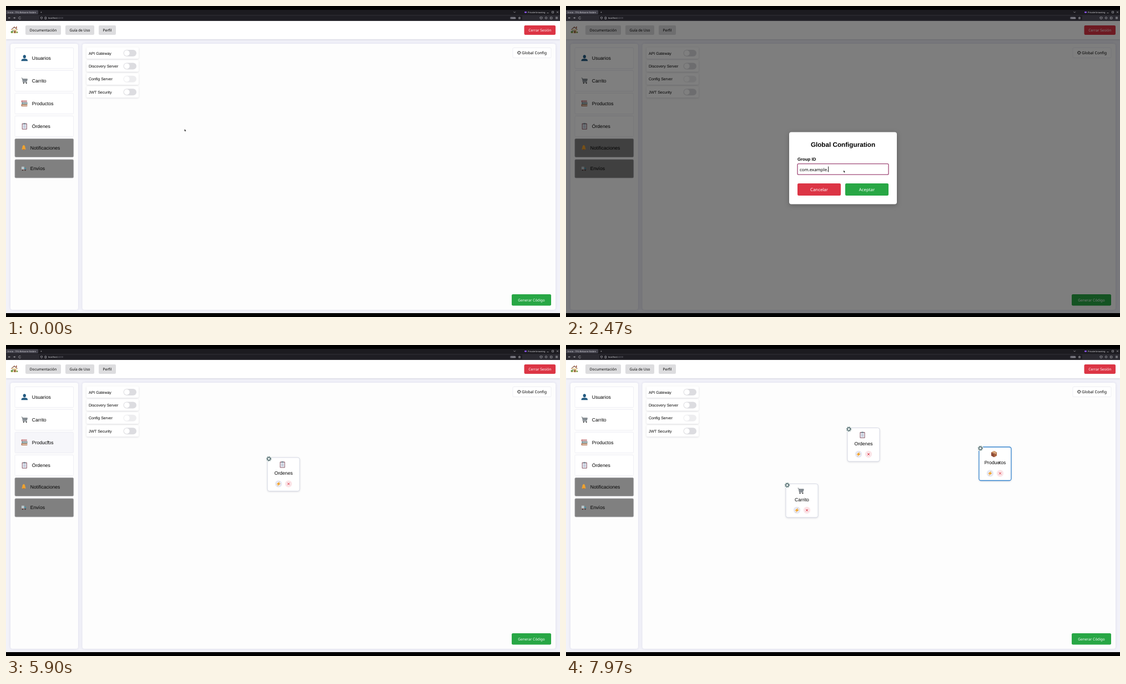
These frames come from a looping animation (998x561 px, 8 s). An HTML page:

```html
<!DOCTYPE html>
<html lang="es">
<head>
<meta charset="utf-8">
<title>Inicio</title>
<style>
html, body { margin: 0; width: 100%; height: 100%; overflow: hidden; background: #000; }
svg { display: block; width: 100vw; height: 100vh; }
text { text-rendering: geometricPrecision; font-family: "Liberation Sans", Arial, sans-serif; fill: #000; }
.noto { font-family: "Noto Sans", "Open Sans", sans-serif; }
.mid { text-anchor: middle; }
.item { font-size: 8.6px; }
.light { fill: #fff; }
.chrome text { font: 4px "Noto Sans", sans-serif; fill: #d8d8dc; }
.chrome .dim { fill: #77767f; }
.line { fill: none; stroke: #cfcfd4; stroke-width: .6; }
.soft { filter: drop-shadow(0 1px 1.5px rgba(0, 0, 30, .13)); }
.panel { fill: #fdfdfd; filter: drop-shadow(0 0 2px rgba(60, 60, 120, .13)); }
.dialog { fill: #fff; filter: drop-shadow(0 2px 4px rgba(0, 0, 0, .25)); }
</style>
</head>
<body>
<svg id="stage" viewBox="0 0 998 561" preserveAspectRatio="none">
  <defs>
    <g id="house">
      <rect x="-4.5" y="-1" width="9" height="7" fill="#efd9a4"/>
      <path d="M-6-.5 0-6 6-.5 5-.2 0-4-5-.2z" fill="#8a5a44"/>
      <path d="M3-6h1.6v3H3z" fill="#a35a48"/>
      <path d="M-.3 1.5h2.6V6H-.3z" fill="#8b5637"/>
      <path d="M-3.4 1h2v2h-2z" fill="#6fa8c8"/>
      <circle cx="-4.5" cy="4" r="2" fill="#6f9b45"/><circle cx="5" cy="4.6" r="1.4" fill="#6f9b45"/>
    </g>
    <g id="person" fill="#235a80">
      <ellipse cy="-2.4" rx="2.6" ry="3.1"/><path d="M-5.8 5.6C-5.8 1.8-3 1.6 0 1.6s5.8.2 5.8 4z"/>
    </g>
    <g id="cart">
      <path d="M-3.9-3.2H5.2L4 1.4H-2.9z" fill="#aeb4ba"/>
      <path d="M-5.5-4.8h1.4L-2.4 3H4.4M-3.6-2.9H5.2L4 1.3h-6.8M-1.4-2.9l.5 4.2M1-2.9v4.2M3.2-2.9 2.6 1.3" fill="none" stroke="#596168" stroke-width=".8"/>
      <circle cx="-1.5" cy="4.4" r="1.1" fill="#333"/><circle cx="3.4" cy="4.4" r="1.1" fill="#333"/>
    </g>
    <g id="books">
      <path d="M-5.5-5.2H4.5v3h-10z" fill="#b9545b"/><path d="M-4.2-4.3h8.9v1.2h-8.9z" fill="#e8e2e0"/>
      <path d="M-4.8-2H5.4v3.2H-4.8z" fill="#4f7f8d"/><path d="M-3.6-1.1h9v1.3h-9z" fill="#e8e6dc"/>
      <path d="M-5.6 1.4H5v3.9H-5.6z" fill="#a9694c"/><path d="M-4.4 2.6h9.6v1.5h-9.6z" fill="#eee2cc"/>
    </g>
    <g id="clip">
      <rect x="-4.6" y="-5" width="9.2" height="11" rx=".9" fill="#936573"/>
      <rect x="-3.5" y="-3.6" width="7" height="8.5" fill="#eef1f8"/>
      <path d="M-2.2-1h4.4M-2.2.8h4.4M-2.2 2.6h4.4" stroke="#8b9bb2" stroke-width=".7"/>
      <path d="M-2-5.2h1.1a1 1 0 0 1 1.8 0H2v2h-4z" fill="#70808c"/>
    </g>
    <g id="bell" fill="#efa22f">
      <path d="M0-4.6C2.6-4 2.5-1 2.8.8L4 2.8h-8L-2.8.8C-2.5-1-2.6-4 0-4.6z"/><circle cy="3.2" r="1.2" fill="#c87b24"/>
    </g>
    <g id="truck">
      <path d="M-4-3.4h4.8v5.8H-4z" fill="#b9c4c8"/><path d="M1-1.6h2.2L4.4.6v1.8H1z" fill="#4c8ca0"/>
      <path d="M-4 1.7h8.4v1H-4z" fill="#8f5550"/>
      <circle cx="-2" cy="3" r="1" fill="#333"/><circle cx="2.6" cy="3" r="1" fill="#333"/>
    </g>
    <g id="box">
      <path d="M-5-3 0-5.4 5-3 0-.4z" fill="#c58457"/><path d="M-5-3 0-.4V6l-5-2.8z" fill="#8e4c39"/>
      <path d="M5-3 0-.4V6l5-2.8z" fill="#a9633f"/><path d="M-2.9-4-1.3-4.7 3.6-2.2V.2L2-.5v-1z" fill="#e2bd94"/>
    </g>
    <path id="bolt" d="M2.4-4.6-3.8.7-.4 1-2.6 4.6 3.9-.8.5-1z" fill="#f6a11d"/>
    <g id="gear" fill="none">
      <circle r="3.5" stroke-width="1.5" stroke-dasharray="1.35 1.4"/><circle r="2.5" stroke-width="1"/>
    </g>
  </defs>

  <g class="chrome">
    <path fill="#1c1b20" d="M0 7h998v9H0z"/><path fill="#2b2a31" d="M0 16h998v11H0z"/>
    <rect x="0" y="7.6" width="58" height="7.4" rx="1.5" fill="#42414b"/>
    <rect x="60" y="17.6" width="870" height="8" rx="1.5" fill="#1e1d23"/>
    <text x="3" y="12.7" textLength="">Inicio - TFG Belvarre Nolán</text>
    <text x="52" y="12.5">×</text><text x="62" y="12.8" style="font-size:5px">+</text>
    <text x="940" y="12.6">Private browsing</text>
    <ellipse cx="936" cy="11.3" rx="2.2" ry="1.4" fill="#9059ff"/>
    <path class="line" d="m914.500 10.300 1.700 1.700 1.700-1.700M974.500 12.500h3M983.500 9.700h3v3h-3zM992 9.700l3 3m0-3-3 3
      M8 21.500H4.500l1.500-1.500m-1.500 1.500L6 23M13 21.500h3.500L15 20m1.500 1.500L15 23M26.500 20.500a2 2 0 1 0 .2 1.800
      M62.500 20h3v1.500q0 1.500-1.500 2.200-1.500-.7-1.500-2.200zM70 20h2.500v3.500H70z
      M925 19.800l.6 1.200h1.200l-1 1 .4 1.400-1.200-.7-1.200.7.400-1.400-1-1h1.200z
      M962 20h4v1.500a2 2 0 0 1-4 0zM990 20h4M990 21.500h4M990 23h4"/>
    <circle class="line" cx="973" cy="21.500" r="1.700"/><path class="line" d="M980.500 20h3.300v3.300h-3.300z"/>
    <text x="76" y="23">localhost<tspan class="dim">:4200</tspan></text>
    <rect x="908" y="19.500" width="10.500" height="4.300" rx="1.500" fill="#55545e"/>
    <text x="909" y="23" style="font-size:3.500px">150%</text>
  </g>

  <svg x="0" y="27" width="998" height="527" viewBox="0 27 998 527">
    <path fill="#f2f2f9" d="M0 27h998v527H0z"/>
    <path class="soft" fill="#fff" d="M0 27h998v33H0z"/>
    <use href="#house" x="15" y="43"/>
    <g id="page"></g>
    <g id="cards"></g>
    <g id="modal">
      <path d="M0 27h998v527H0z" opacity=".5"/>
      <rect class="dialog" x="402" y="227.500" width="194" height="130" rx="4"/>
      <text class="mid" x="499" y="253.700" font-size="11.700" font-weight="bold">Global Configuration</text>
      <text x="417" y="279.200" font-size="7.800" font-weight="bold">Group ID</text>
      <rect id="field" x="417" y="284.700" width="164" height="19.500" rx="2" fill="#fff"/>
      <text id="value" class="noto" x="421" y="297.500" font-size="7.800"></text>
      <path id="caret" d="M0 289.500v10" stroke="#000" stroke-width=".9"/>
      <g id="actions"></g>
    </g>
  </svg>
  <path id="cursor" d="M0 0v4.200l1-.9.700 1.500.8-.4-.7-1.400h1.300z" fill="#000" stroke="#fff" stroke-width=".35"/>
</svg>

<script>
const LOOP = 8000;
const $ = id => document.getElementById(id);

const button = (x, y, w, h, fill, label, size, cls = 'light') =>
  `<rect x="${x}" y="${y}" width="${w}" height="${h}" rx="2.2" fill="${fill}"/>
   <text class="noto mid ${cls}" x="${x + w / 2}" y="${y + h / 2 + size * .36}" font-size="${size}">${label}</text>`;

const menu = [
  ['Usuarios', 'person', 75.3], ['Carrito', 'cart', 116.3], ['Productos', 'books', 157.3],
  ['Órdenes', 'clip', 198.3], ['Notificaciones', 'bell', 239.5, true], ['Envíos', 'truck', 277, true]
];

const menuItem = ([label, icon, y, disabled]) => {
  const h = disabled ? 33 : 37.4, mid = y + h / 2;
  return `<rect class="${disabled ? '' : 'entry'}" x="16" y="${y}" width="105.6" height="${h}" rx="1.8"
      fill="${disabled ? '#808080' : '#fff'}" stroke="${disabled ? '#a2a2a8' : '#ebebf3'}" stroke-width=".8"/>
    <use href="#${icon}" x="${disabled ? 32 : 33.3}" y="${mid - .3}"/>
    <text class="item" x="${disabled ? 43.8 : 46.8}" y="${mid + 2.8}">${label}</text>`;
};

const toggle = (label, i) => {
  const y = 85 + i * 23.4;
  return `<rect class="soft" x="145" y="${y - 10.5}" width="94" height="20.6" rx="2" fill="#fff"/>
    <text x="149" y="${y + 2.5}" font-size="7">${label}</text>
    <g opacity="${label === 'Config Server' ? .5 : 1}">
      <rect x="211.500" y="${y - 6}" width="23.500" height="12" rx="6" fill="#dcdce0"/>
      <circle cx="217.600" cy="${y}" r="5" fill="#fff"/>
    </g>`;
};

$('page').innerHTML =
  button(35, 35, 64, 17, '#dddddf', 'Documentación', 6.5, '') +
  button(107, 35, 52, 17, '#dddddf', 'Guía de Uso', 6.5, '') +
  button(167, 35, 31, 17, '#dddddf', 'Perfil', 6.5, '') +
  button(933.5, 35, 56.5, 17, '#dc3545', 'Cerrar Sesión', 6.5) +
  `<rect class="panel" x="8" y="68" width="122" height="480" rx="4"/>
   <rect class="panel" x="137.500" y="68" width="852.500" height="480" rx="4"/>` +
  menu.map(menuItem).join('') +
  ['API Gateway', 'Discovery Server', 'Config Server', 'JWT Security'].map(toggle).join('') +
  `<rect x="913" y="75.300" width="69" height="18.300" rx="2" fill="#fff" stroke="#ebebf1" stroke-width=".8"/>
   <use href="#gear" transform="translate(924.300 84.300) scale(.8)" stroke="#333"/>
   <text class="noto" x="929.300" y="87" font-size="7.050">Global Config</text>` +
  button(911, 520, 71, 20.5, '#28a745', 'Generar Código', 6.55);

$('actions').innerHTML = button(417, 320, 78, 22, '#dc3545', 'Cancelar', 7.8) +
  button(503, 320, 78, 22, '#28a745', 'Aceptar', 7.8);

const card = (id, label, icon) => `<g id="${id}">
  <rect class="soft frame" width="58" height="60.500" rx="3.500" fill="#fff"/>
  <circle cx="2.500" cy="2.300" r="5.300" fill="#eaf1ee"/><use href="#gear" x="2.500" y="2.300" stroke="#38535a"/>
  <use href="#${icon}" x="27" y="12.500"/>
  <text class="item mid" x="29" y="31">${label}</text>
  <circle cx="20" cy="47.500" r="6.200" fill="#e6e8f3"/><use href="#bolt" x="20" y="47.500"/>
  <circle cx="38" cy="47.500" r="6.200" fill="#fbe5e8"/>
  <path d="m36.100 45.600 3.800 3.800m0-3.800-3.800 3.800" stroke="#dc3545" stroke-width="1"/></g>`;
$('cards').innerHTML = card('orders', 'Ordenes', 'clip') + card('products', 'Productos', 'box') +
  card('basket', 'Carrito', 'cart');

// [time, x, y]
const pointer = [
  [120, 321.5, 222], [760, 946, 86], [980, 946, 86], [1830, 545, 325], [2200, 500, 296], [3830, 500, 298],
  [4080, 527, 338], [4270, 554, 334], [4420, 554, 334], [5100, 63, 217], [5180, 63, 217], [5500, 500, 230],
  [5560, 500, 230], [5900, 75, 172], [5950, 74, 172], [6160, 701, 186], [6190, 701, 186], [6310, 62, 136],
  [6340, 62, 136], [6460, 425, 278], [6870, 425, 278], [7040, 501, 228], [7070, 501, 228], [7230, 526, 184],
  [7420, 537, 174], [7480, 537, 174], [7660, 707, 184], [7700, 707, 184], [7970, 779, 210]
];
const paths = {
  orders: { from: 5500, selected: [7040, 7640], keys: [[7070, 471, 203], [7230, 496, 159.5], [7420, 507, 149.5]] },
  products: { from: 6160, selected: [7640, LOOP], keys: [[7700, 672, 158.5], [7970, 744, 184]] },
  basket: { from: 6460, selected: [LOOP, LOOP], keys: [[0, 396, 250.5]] }
};

const during = (t, [start, end]) => t >= start && t < end;

function along(keys, t) {
  const next = keys.findIndex(k => k[0] > t);
  if (next === 0) return keys[0].slice(1);
  if (next < 0) return keys.at(-1).slice(1);
  const [t0, x0, y0] = keys[next - 1], [t1, x1, y1] = keys[next];
  const p = (t - t0) / (t1 - t0), e = p * p * (3 - 2 * p);
  return [x0 + (x1 - x0) * e, y0 + (y1 - y0) * e];
}

function typed(t) {
  const initial = 'com.example.', final = 'com.ehub';
  if (t < 3400) return initial.slice(0, 12 - Math.max(0, Math.min(7, Math.floor((t - 2570) / 85))));
  return final.slice(0, 6 + Math.min(2, Math.floor((t - 3400) / 130)));
}

function draw(now) {
  const t = now % LOOP;
  const [x, y] = along(pointer, t);
  const open = during(t, [900, 4170]), focused = during(t, [2230, 4100]);

  $('cursor').setAttribute('transform', `translate(${x} ${y})`);
  $('cursor').style.display = during(t, [2570, 3830]) ? 'none' : '';

  document.querySelectorAll('.entry').forEach((entry, i) => {
    const dy = y - menu[i][2];
    entry.style.fill = !open && x > 16 && x < 122 && dy > 0 && dy < 37.4 ? '#f6f6fa' : '';
  });

  $('modal').style.display = open ? '' : 'none';
  $('value').textContent = typed(t);
  $('field').setAttribute('stroke', focused ? '#a04a78' : '#e8e8f0');
  $('field').setAttribute('stroke-width', focused ? 1.3 : .8);
  $('caret').style.display = focused ? '' : 'none';
  if (focused) $('caret').setAttribute('transform', `translate(${421.5 + $('value').getComputedTextLength()} 0)`);

  for (const [id, { from, selected, keys }] of Object.entries(paths)) {
    const active = during(t, selected), frame = $(id).querySelector('.frame');
    $(id).style.display = t < from ? 'none' : '';
    $(id).setAttribute('transform', `translate(${along(keys, t)})`);
    frame.setAttribute('stroke', active ? '#3484d0' : '#d3d6e2');
    frame.setAttribute('stroke-width', active ? 1.3 : .9);
  }
}

function tick() {
  draw(performance.now());
  requestAnimationFrame(tick);
}
tick();
</script>
</body>
</html>
```
